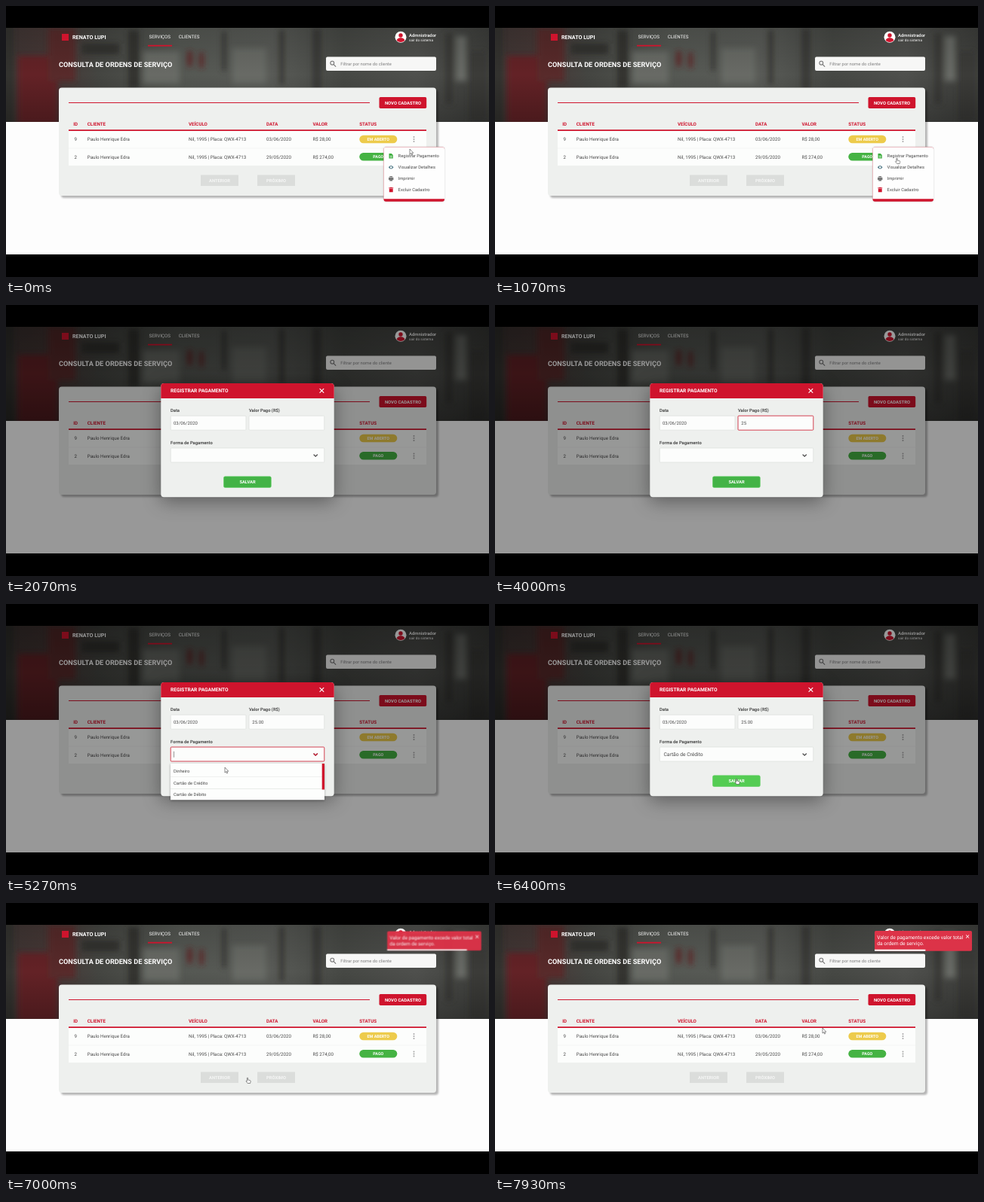
An HTML page for the animation above (8 s loop, 640 px wide and 360 px high).

```html
<!DOCTYPE html>
<html lang="pt-BR">
<head>
<meta charset="utf-8">
<title>Consulta de ordens de serviço</title>
<style>
:root { --out: cubic-bezier(.215, .61, .355, 1); }
html, body { margin: 0; width: 100%; height: 100%; overflow: hidden; background: #000; }
svg { display: block; }
#stage { width: 100vw; height: 100vh; }
text { font: 6.2px Roboto, sans-serif; fill: #4a4a4a; white-space: pre; text-rendering: geometricPrecision; }
.b { font-weight: 700; }
.mid { text-anchor: middle; }
.white, .white text { fill: #fff; }
.red { fill: #cf142d; }
.head text { font-weight: 700; fill: #cf142d; }
.label { font-size: 5.8px; font-weight: 500; fill: #333; }
.small, .small text { font-size: 5.8px; }
.field { fill: #fcfdfc; stroke: #dcdfdc; stroke-width: .7; }
.focus { fill: none; stroke: #d9374a; stroke-width: .9; }
.line { fill: none; stroke-linecap: round; stroke-linejoin: round; }

/* Every animation shares one 8 s clock; fades take 300 ms */
.a { animation: 8s linear infinite; }
.fade { animation: 8s var(--out) infinite; }
.step { animation: 8s step-end infinite; }

#menu { animation-name: menu; }
@keyframes menu { 0%, 13.56% { opacity: 1 } 17.31%, 100% { opacity: 0 } }
#dialog { animation-name: dialog; }
#overlay { animation-name: dialog; animation-timing-function: ease; }
@keyframes dialog {
  0%, 13.56% { opacity: 0 } 17.31%, 82% { opacity: 1 } 85.75%, 100% { opacity: 0 }
}
#valueFocus { animation-name: valueFocus; }
@keyframes valueFocus { 0% { visibility: hidden } 33.4% { visibility: visible } 61.6%, 100% { visibility: hidden } }
#caret { animation-name: caret; }
@keyframes caret { 0% { visibility: hidden } 33.4% { visibility: visible } 40%, 100% { visibility: hidden } }
.k1 { animation-name: k1; }
.k2 { animation-name: k2; }
.k3 { animation-name: k3; }
.k4 { animation-name: k4; }
@keyframes k1 { 0% { visibility: hidden } 44.1%, 100% { visibility: visible } }
@keyframes k2 { 0% { visibility: hidden } 50%, 100% { visibility: visible } }
@keyframes k3 { 0% { visibility: hidden } 51.2%, 100% { visibility: visible } }
@keyframes k4 { 0% { visibility: hidden } 52.4%, 100% { visibility: visible } }
#selectFocus { animation-name: selectFocus; }
@keyframes selectFocus { 0% { visibility: hidden } 61.6% { visibility: visible } 72.5%, 100% { visibility: hidden } }
#options { animation-name: options; }
@keyframes options {
  0%, 61.6% { opacity: 0 } 65.35%, 72.5% { opacity: 1 } 76.25%, 100% { opacity: 0 }
}
#choice { animation-name: choice; }
@keyframes choice { 0% { visibility: hidden } 72.5%, 100% { visibility: visible } }
#save { animation-name: save; }
@keyframes save { 0%, 76.2% { fill: #43b346 } 78%, 100% { fill: #54cc53 } }

#toast {
  transform-origin: 567.5px 50.5px;
  animation: bounce 8s var(--out) infinite, appear 8s var(--out) infinite;
}
@keyframes bounce {
  0%, 82% { transform: scale(.3) }
  84.5% { transform: scale(1.1) }
  87% { transform: scale(.9) }
  89.5% { transform: scale(1.03) }
  92% { transform: scale(.97) }
  94.5%, 100% { transform: scale(1) }
}
@keyframes appear { 0%, 82% { opacity: 0 } 89.5%, 100% { opacity: 1 } }
#progress { transform-origin: 503px 63px; animation-name: progress; }
@keyframes progress { 0%, 82% { transform: scaleX(1) } 100% { transform: scaleX(.5) } }

#cursor { animation: cursor 8s ease-in-out infinite; }
@keyframes cursor {
  0%, 1% { transform: translate(535px, 190px) }
  10.8%, 16.5% { transform: translate(532.5px, 202px) }
  24.4% { transform: translate(372px, 157px) }
  58.4% { transform: translate(350px, 176px) }
  61.4%, 62% { transform: translate(330px, 200px) }
  65.6%, 69% { transform: translate(290px, 217px) }
  72%, 72.8% { transform: translate(290px, 237px) }
  77.5%, 90.6% { transform: translate(320px, 232px) }
  99%, 100% { transform: translate(434px, 166px) }
}
#arrow { animation-name: arrow; }
#hand { animation-name: hand; }
@keyframes arrow {
  0% { visibility: visible } 7.5% { visibility: hidden } 17.5% { visibility: visible }
  24.3% { visibility: hidden } 62.5% { visibility: visible } 76.25% { visibility: hidden }
  91.25%, 100% { visibility: visible }
}
@keyframes hand {
  0% { visibility: hidden } 7.5% { visibility: visible } 17.5% { visibility: hidden }
  58.4% { visibility: visible } 62.5% { visibility: hidden } 76.25% { visibility: visible }
  91.25%, 100% { visibility: hidden }
}
</style>
</head>
<body>
<svg id="stage" viewBox="0 0 640 360">
  <defs>
    <linearGradient id="wall">
      <stop offset="0" stop-color="#3f3634"/>
      <stop offset=".1" stop-color="#473836"/>
      <stop offset=".19" stop-color="#444541"/>
      <stop offset=".36" stop-color="#555853"/>
      <stop offset=".55" stop-color="#595b57"/>
      <stop offset=".7" stop-color="#464844"/>
      <stop offset=".85" stop-color="#4f504d"/>
      <stop offset="1" stop-color="#3d3e3b"/>
    </linearGradient>
    <linearGradient id="shade" x2="0" y2="1">
      <stop offset="0" stop-opacity=".15"/>
      <stop offset=".5" stop-opacity="0"/>
      <stop offset="1" stop-opacity=".25"/>
    </linearGradient>
    <filter id="blur"><feGaussianBlur stdDeviation="3.5"/></filter>
    <clipPath id="band"><path d="M0 29H640V154H0z"/></clipPath>
    <g id="dots" fill="#a6a6a6"><circle cy="-3" r="1"/><circle r="1"/><circle cy="3" r="1"/></g>
  </defs>

  <path fill="#fdfdfd" d="M0 29H640V330H0z"/>

  <!-- Workshop backdrop -->
  <g clip-path="url(#band)">
    <path fill="url(#wall)" d="M0 29H640V154H0z"/>
    <g filter="url(#blur)">
      <path fill="#632426" d="M16 66H68V158H16z"/>
      <path fill="#592c2c" d="M56 30H92V100H56z"/>
      <path fill="#5f2c2b" d="M240 60H247V80H240zM256 62H262V82H256z"/>
      <path fill="#33322f" d="M-5 25H10V160H-5zM100 50H150V64H100zM162 32H176V110H162z"/>
      <path fill="#3a3a37" d="M286 34H292V86H286zM362 32H369V104H362zM406 30H418V112H406zM582 36H592V130H582zM614 60H636V154H614z"/>
      <path fill="#686a65" d="M182 60H230V104H182zM300 56H345V104H300zM596 40H610V100H596z"/>
    </g>
    <path fill="url(#shade)" d="M0 29H640V154H0z"/>
  </g>

  <!-- Header -->
  <g class="white">
    <path class="red" d="M74 37h9v9h-9z"/>
    <text class="b" x="88" y="44.3" style="font-size:7.2px">RENATO LUPI</text>
    <text x="189.5" y="42.8">SERVIÇOS</text>
    <text x="228.7" y="42.8">CLIENTES</text>
    <path class="red" d="M188 51.8h32v1.8h-32z"/>
    <circle cx="523" cy="41.2" r="7.5"/>
    <g class="red"><circle cx="523" cy="39" r="2.7"/><path d="M517.8 46c0-5 10.4-5 10.4 0c-3 2.5-7.4 2.5-10.4 0z"/></g>
    <text x="534" y="41.2" style="font-size:5.9px;font-weight:500">Admnistrador</text>
    <text x="534" y="46.8" style="font-size:4.7px">sair do sistema</text>
    <text class="b" x="70" y="80.5" style="font-size:9.18px">CONSULTA DE ORDENS DE SERVIÇO</text>
  </g>
  <rect x="424" y="67.5" width="146" height="18.5" rx="2" fill="#f7f7f6"/>
  <g class="line" stroke="#777" stroke-width="1.1"><circle cx="432.3" cy="75.7" r="2.4"/><path d="M434.2 77.7l2.6 2.6"/></g>
  <text class="small" x="443.3" y="78.9" style="fill:#808080">Filtrar por nome do cliente</text>

  <!-- Orders card -->
  <rect x="70" y="108.5" width="500" height="143.5" rx="4" fill="#eef0ee" style="filter:drop-shadow(3px 3px 1px rgba(0,0,0,.28))"/>
  <path class="red" d="M83 128h399v1H83zM83 164.3h474v1.6H83z"/>
  <rect class="red" x="494.5" y="121" width="62.7" height="15" rx="1.8"/>
  <text class="b mid white" x="526" y="130.7" style="font-size:5.9px">NOVO CADASTRO</text>
  <g class="head">
    <text x="89.3" y="158.5">ID</text>
    <text x="107.8" y="158.5">CLIENTE</text>
    <text x="242" y="158.5">VEÍCULO</text>
    <text x="345" y="158.5">DATA</text>
    <text x="406.5" y="158.5">VALOR</text>
    <text x="468.3" y="158.5">STATUS</text>
  </g>
  <path fill="#fcfdfc" d="M83 165.9h474v22.8H83zM83 189.3h474v22.8H83z"/>
  <g>
    <text x="90.5" y="179.3">9</text>
    <text x="107.8" y="179.3">Paulo Henrique Edra</text>
    <text x="242" y="179.3">Nil, 1995 | Placa: QWX-4713</text>
    <text x="345" y="179.3">03/06/2020</text>
    <text x="406.5" y="179.3">R$ 28,00</text>
    <rect x="468.3" y="171.8" width="50" height="10.4" rx="5.2" fill="#edcb4c"/>
    <text class="b mid white" x="493.3" y="178.9" style="font-size:5.4px">EM ABERTO</text>
    <use href="#dots" x="540.5" y="177"/>
  </g>
  <g>
    <text x="90.5" y="202.7">2</text>
    <text x="107.8" y="202.7">Paulo Henrique Edra</text>
    <text x="242" y="202.7">Nil, 1995 | Placa: QWX-4713</text>
    <text x="345" y="202.7">29/05/2020</text>
    <text x="406.5" y="202.7">R$ 274,00</text>
    <rect x="468.3" y="195.1" width="50" height="10.4" rx="5.2" fill="#45b343"/>
    <text class="b mid white" x="493.3" y="202.2" style="font-size:5.4px">PAGO</text>
    <use href="#dots" x="540.5" y="200.4"/>
  </g>
  <g class="small">
    <path fill="#dbdddb" d="M258 224.5h50v14.5h-50zM333 224.5h50v14.5h-50z"/>
    <text class="b mid" x="283" y="233.9" style="fill:#f6f7f6">ANTERIOR</text>
    <text class="b mid" x="358" y="233.9" style="fill:#f6f7f6">PRÓXIMO</text>
  </g>

  <!-- Row menu -->
  <g id="menu" class="fade small">
    <g style="filter:drop-shadow(0 .5px 1px rgba(0,0,0,.18))">
      <rect class="red" x="500.5" y="187.5" width="80.5" height="72.2" rx="3"/>
      <path fill="#fefefe" d="M500.5 190.5a3 3 0 0 1 3-3h74.5a3 3 0 0 1 3 3V256.3H500.5z"/>
    </g>
    <path fill="#3eae3f" d="M507.5 196h3.3l2 2v4.5h-5.3z"/>
    <path stroke="#fff" stroke-width=".7" d="M508.7 199.3h3M508.7 201h3"/>
    <path fill="#587f8c" d="M506.8 214.2q3.400-4.400 6.800 0q-3.400 4.400-6.800 0z"/>
    <circle cx="510.2" cy="214.2" r="1.2" fill="#fff"/>
    <path fill="#777" d="M508.3 226h3.800v1.300h-3.800zM507 227.800h6.400v3.200h-1.300v1.500h-3.800V231H507z"/>
    <path class="red" d="M507.3 241.3h1.700l.5-.6h1.500l.5.6h1.700v.9h-5.900zM507.800 242.700h4.900v4.600h-4.900z"/>
    <text x="519.6" y="201.3">Registrar Pagamento</text>
    <text x="519.6" y="216.3">Visualizar Detalhes</text>
    <text x="519.6" y="231.3">Imprimir</text>
    <text x="519.6" y="246.3">Excluir Cadastro</text>
  </g>

  <path id="overlay" class="fade" fill="rgba(0,0,0,.4)" d="M0 29H640V330H0z"/>

  <!-- Payment dialog -->
  <g id="dialog" class="fade">
    <rect x="205.3" y="104" width="229.4" height="151.3" rx="4" fill="#eef0ee" style="filter:drop-shadow(0 6px 12px rgba(0,0,0,.38))"/>
    <path class="red" d="M205.3 124v-16a4 4 0 0 1 4-4h221.4a4 4 0 0 1 4 4v16z"/>
    <text class="b white" x="218" y="116.4" style="font-size:6.6px">REGISTRAR PAGAMENTO</text>
    <path class="line" stroke="#fff" stroke-width="1.1" d="M415.9 111.4l5 5m0-5l-5 5"/>
    <text class="label" x="218" y="142.3">Data</text>
    <text class="label" x="322" y="142.3">Valor Pago (R$)</text>
    <text class="label" x="218" y="184.6">Forma de Pagamento</text>
    <rect class="field" x="218.2" y="147.2" width="99.8" height="19" rx="1"/>
    <rect class="field" x="322" y="147.2" width="99.8" height="19" rx="1"/>
    <rect class="field" x="218.2" y="190" width="203.6" height="19" rx="1"/>
    <text x="222" y="159" style="font-size:6px">03/06/2020</text>
    <rect id="valueFocus" class="focus step" x="322" y="147.2" width="99.8" height="19" rx="1"/>
    <path id="caret" class="step" fill="#444" d="M326.3 153h.7v8h-.7z"/>
    <text x="326.3" y="159" style="font-size:6px"><tspan class="step k1">2</tspan><tspan class="step k2">5</tspan><tspan class="step k3">.0</tspan><tspan class="step k4">0</tspan></text>
    <path class="line" stroke="#444" stroke-width="1.2" d="M408 199l2.2 2.2l2.2-2.2"/>
    <text id="choice" class="step" x="223.5" y="202" style="font-size:6.7px">Cartão de Crédito</text>
    <rect id="save" class="a" x="288.5" y="227.8" width="62.8" height="14.7" rx="1.8" stroke="#5fce60" stroke-width=".6"/>
    <text class="b mid white small" x="320" y="237.3">SALVAR</text>

    <g id="selectFocus" class="step">
      <rect class="focus" x="218.2" y="190" width="203.6" height="19" rx="1"/>
      <path class="line" stroke="#cf142d" stroke-width="1.2" d="M408 199l2.2 2.2l2.2-2.2"/>
      <path fill="#555" d="M222.3 195.8h.6v8h-.6z"/>
    </g>
    <g id="options" class="fade small">
      <path fill="#fdfefd" d="M218 212h204v48.3H218z" style="filter:drop-shadow(0 1px 1.5px rgba(0,0,0,.35))"/>
      <path fill="#e4e6e4" d="M218 229.4h201v.6H218zM218 245.1h201v.6H218z"/>
      <path class="red" d="M418.7 212h3.3v34.5h-3.3z"/>
      <text x="222" y="224">Dinheiro</text>
      <text x="222" y="239.7">Cartão de Crédito</text>
      <text x="222" y="255.4">Cartão de Débito</text>
    </g>
  </g>

  <!-- Error notice -->
  <g id="toast" class="white">
    <rect x="503" y="37" width="129" height="26.7" rx="1.8" fill="#dc3348"/>
    <path id="progress" class="a" d="M503 61.7h129v2H503z"/>
    <text x="506.3" y="48.2" style="font-size:6.7px">Valor de pagamento excede valor total</text>
    <text x="506.3" y="56.2" style="font-size:6.7px">da ordem de serviço.</text>
    <path class="line" stroke="#fff" stroke-width="1" d="M624.3 42.7l3.6 3.6m0-3.6l-3.6 3.6"/>
  </g>

  <g id="cursor" fill="#fff" stroke="#444" stroke-width=".6" stroke-linejoin="round">
    <path id="arrow" class="step" d="M0 0V7L1.6 5.6L2.7 8L3.7 7.5L2.7 5.2H4.8z"/>
    <path id="hand" class="step" d="M-.6 .4q.6-.8 1.2 0V3l2.7.6q1 .3.9 1.4L3.6 7.5H.2L-2 4.8q.2-.9 1.4 0z"/>
  </g>

  <path d="M0 0H640V29H0zM0 330H640V360H0z"/>
</svg>
</body>
</html>
```
